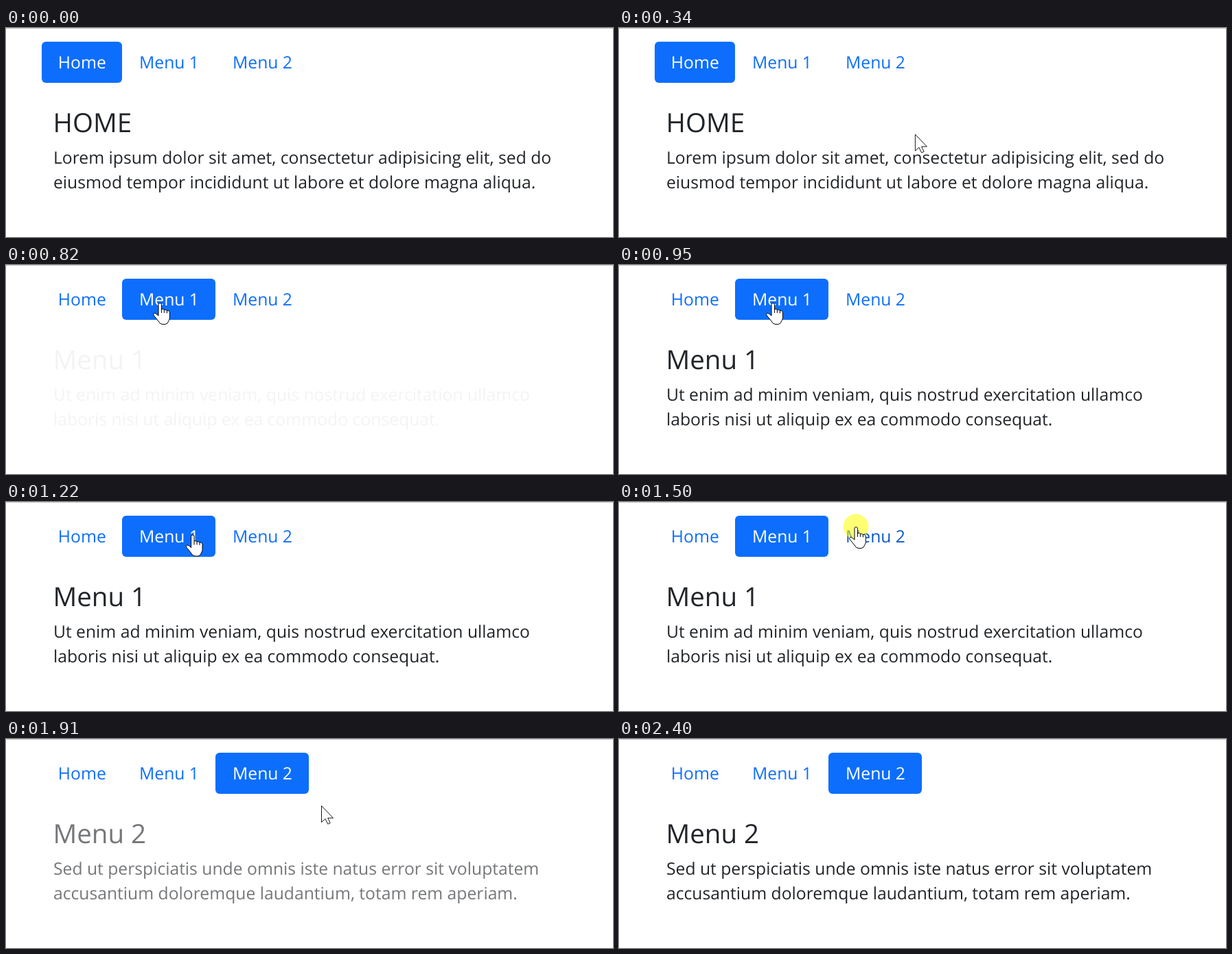
Animation of 884 by 305 pixels, one loop 2.68 s. Source, as an HTML page:

```html
<!DOCTYPE html>
<html lang="en">
<head>
<meta charset="utf-8">
<title>Tabs</title>
<style>
  html, body { margin: 0; width: 100%; height: 100%; overflow: hidden; background: #fff; }
  svg { display: block; width: 884px; height: 305px; }
  text { font: 24.7px "Open Sans", "Noto Sans", sans-serif; text-rendering: geometricPrecision; }
  .tab rect { fill: #0d6efd; }
  .tab text { text-anchor: middle; }
  .pane { fill: #212529; }
  .pane .title { font-size: 38.5px; }
  .cursor { fill: #fff; stroke: #000; stroke-linejoin: round; }
</style>
</head>
<body>
<svg viewBox="0 0 884 305">
  <rect width="884" height="1" fill="#c8c8c8"/>
  <g class="tab"><rect x="52" y="20" width="117" height="60" rx="6"/><text x="110.8" y="59">Home</text></g>
  <g class="tab"><rect x="169" y="20" width="136" height="60" rx="6"/><text x="237.5" y="59">Menu 1</text></g>
  <g class="tab"><rect x="305" y="20" width="136" height="60" rx="6"/><text x="373.5" y="59">Menu 2</text></g>

  <g class="pane">
    <text class="title" x="68.5" y="152">HOME</text>
    <text x="69" y="198">Lorem ipsum dolor sit amet, consectetur adipisicing elit, sed do</text>
    <text x="69" y="234">eiusmod tempor incididunt ut labore et dolore magna aliqua.</text>
  </g>
  <g class="pane">
    <text class="title" x="68.5" y="152">Menu 1</text>
    <text x="69" y="198">Ut enim ad minim veniam, quis nostrud exercitation ullamco</text>
    <text x="69" y="234">laboris nisi ut aliquip ex ea commodo consequat.</text>
  </g>
  <g class="pane">
    <text class="title" x="68.5" y="152">Menu 2</text>
    <text x="69" y="198">Sed ut perspiciatis unde omnis iste natus error sit voluptatem</text>
    <text x="69" y="234">accusantium doloremque laudantium, totam rem aperiam.</text>
  </g>

  <g id="pointer">
    <circle id="press" r="18.5" fill="#ff0" fill-opacity=".55"/>
    <path id="arrow" class="cursor" stroke-width=".9" d="M.5 .5V24.5L6 19.5L9.7 27.2L13.2 25.6L9.7 18.3H17.5Z"/>
    <g id="hand" class="cursor">
      <path d="M-2 19V2.8a2.2 2.2 0 0 1 4.4 0V9.5q2.5-1 4 1q2.5-.8 4 1q3-.6 4 2V22q0 2-1.5 4.5q-1.5 4.9-5 5H4q-4 0-6-4.5L-8.5 19q-2-3 .7-3.7q2 0 5.8 3.7z"/>
      <path fill="none" d="M2.4 9v6M6.4 10.5v4.5M10.4 11.5v4"/>
    </g>
  </g>
</svg>
<script>
// The picture refreshes once per step; all moments below are counted in steps.
const LOOP = 2680, STEP = 67.5;
const FADE = 2.1, PANE_DELAY = 2.6;
const LINK = [13, 110, 253], HOVER = [10, 88, 202], WHITE = [255, 255, 255];

const smooth = u => u * u * (3 - 2 * u);
const easeIn = u => u * u;
const easeOut = u => u * (2 - u);

// Pointer stops; the easing leads up to each stop.
const stops = [
  { at: 1, pos: [742, 290] },
  { at: 8, pos: [229, 67], ease: smooth },
  { at: 9, pos: [224, 55], ease: easeOut },
  { at: 15, pos: [224, 55], ease: smooth },
  { at: 22, pos: [345, 36], ease: smooth },
  { at: 26, pos: [345, 36], ease: smooth },
  { at: 28, pos: [459, 97], ease: easeIn },
  { at: 33, pos: [784, 291], ease: easeOut }
];
const clicks = [{ from: 0, to: 1, at: 9.3 }, { from: 1, to: 2, at: 24.1 }];
const hoverStart = [Infinity, 8, 19.5];
const PRESS = [22, 24], HAND = [9, 28], VISIBLE = [1, 35];

const byId = id => document.getElementById(id);
const tabs = [...document.querySelectorAll('.tab')];
const panes = [...document.querySelectorAll('.pane')];
const progress = (step, start, length = FADE) => Math.min(1, Math.max(0, (step - start) / length));
const mix = (a, b, u) => a.map((v, i) => v + (b[i] - v) * u);
const rgb = color => `rgb(${color.map(Math.round)})`;
const within = (step, [start, end]) => step >= start && step < end;
const show = (id, on) => byId(id).setAttribute('visibility', on ? 'visible' : 'hidden');

function pointerAt(step) {
  const i = stops.findIndex(stop => stop.at > step);
  if (i === 0) return stops[0].pos;
  if (i < 0) return stops.at(-1).pos;
  const a = stops[i - 1], b = stops[i];
  return mix(a.pos, b.pos, b.ease(progress(step, a.at, b.at - a.at)));
}

function render(step) {
  const active = [1, 0, 0], opacity = [1, 0, 0];
  for (const { from, to, at } of clicks) {
    if (step < at) continue;
    active[to] = smooth(progress(step, at));
    active[from] = 1 - active[to];
    opacity[from] = 1 - progress(step, at);
    opacity[to] = progress(step, at + PANE_DELAY);
  }
  tabs.forEach((tab, i) => {
    const left = clicks.some(click => click.from === i && step >= click.at);
    const over = left ? 0 : smooth(progress(step, hoverStart[i]));
    const [box, label] = tab.children;
    box.setAttribute('fill-opacity', active[i]);
    label.setAttribute('fill', rgb(mix(mix(LINK, HOVER, over), WHITE, active[i])));
    panes[i].setAttribute('opacity', opacity[i]);
  });

  const visible = within(step, VISIBLE), hand = within(step, HAND);
  byId('pointer').setAttribute('transform', `translate(${pointerAt(step)})`);
  show('press', within(step, PRESS));
  show('hand', visible && hand);
  show('arrow', visible && !hand);
}

const start = performance.now();
function frame() {
  render(Math.floor((performance.now() - start) % LOOP / STEP));
  requestAnimationFrame(frame);
}
frame();
</script>
</body>
</html>
```
